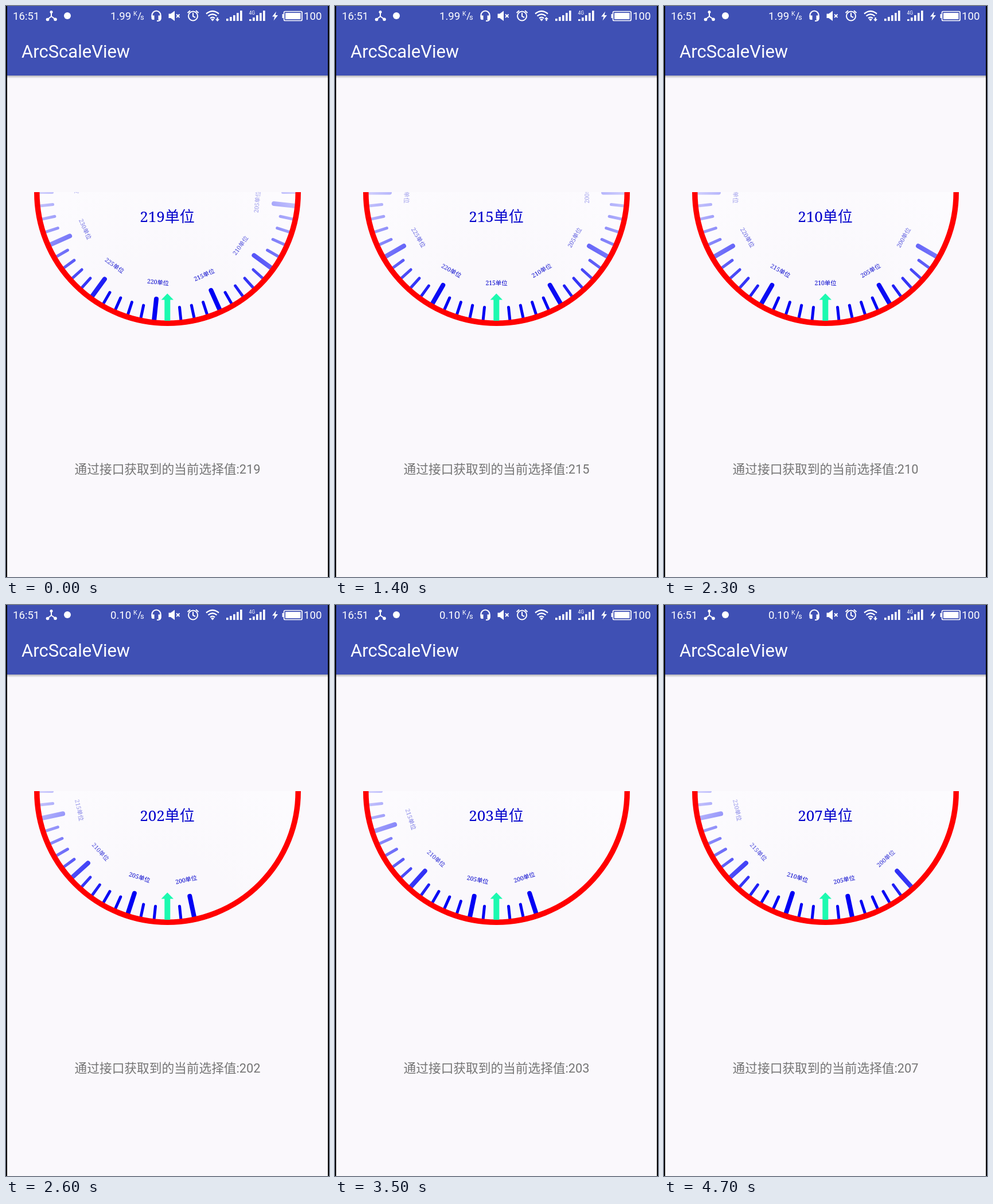
Animation of 563 by 994 pixels, one loop 5100 ms. Source, as an HTML page with a canvas:

```html
<!DOCTYPE html>
<html lang="zh-CN">
<head>
<meta charset="utf-8">
<title>ArcScaleView</title>
<style>
html, body { margin: 0; width: 100%; height: 100%; overflow: hidden; background: #faf8fc; }
canvas { display: block; }
</style>
</head>
<body>
<canvas id="stage" width="563" height="994"></canvas>
<script>
const ctx = document.getElementById('stage').getContext('2d');
const LOOP = 5100, CX = 281.5, CY = 324.5, MIN = 200, STEP = Math.PI / 30;
const SANS = "Roboto, 'Noto Sans CJK SC', 'Noto Sans CJK', sans-serif";
const SERIF = "'Noto Serif', 'Noto Sans CJK SC', 'Noto Sans CJK', serif";

// [start time, state] pairs
const VALUES = [[0, 219], [900, 218], [1000, 216], [1100, 215],
  [1600, 214], [1700, 212], [1800, 211], [1900, 210],
  [2400, 208], [2500, 205], [2600, 202], [2700, 200],
  [3100, 201], [3300, 202], [3500, 203], [3700, 204], [3900, 206], [4600, 207]];
const TRAFFIC = [[0, 'down'], [700, 'up'], [2300, 'down'], [2500, ''], [4700, 'down']];
const SPEED = [[0, '1.99'], [2500, '0.10']];
const at = (track, t) => track.filter(([start]) => start <= t).pop()[1];

function text(str, x, y, size, color, family = SANS, align = 'left') {
  ctx.font = `${size}px ${family}`;
  ctx.textAlign = align;
  ctx.fillStyle = color;
  ctx.fillText(str, x, y);
}

function rect(x, y, w, h, color) {
  ctx.fillStyle = color;
  ctx.fillRect(x, y, w, h);
}

const fill = path => ctx.fill(new Path2D(path));
const stroke = (path, width) => {
  ctx.lineWidth = width;
  ctx.stroke(new Path2D(path));
};

function dot(x, y, r) {
  ctx.beginPath();
  ctx.arc(x, y, r, 0, 7);
  ctx.fill();
}

function bars(x, heights) {
  heights.forEach((h, i) => rect(x + i * 6, 26 - h, 3.6, h, '#fff'));
}

function statusBar(t) {
  text('16:51', 12, 24, 18.6, '#fff');
  text(at(SPEED, t), 182, 24, 18.6, '#fff');
  text('K', 222, 17, 10.5, '#fff');
  text('s', 234, 24, 13, '#fff');
  text('100', 519, 24, 18.6, '#fff');
  text('4G', 423.5, 15, 8.5, '#fff');
  ctx.strokeStyle = ctx.fillStyle = '#fff';
  ctx.lineCap = 'butt';

  // linked nodes, plug marker
  stroke('M79 10V18L72 23.5M79 18L86 23', 2);
  dot(79, 10.5, 2.5);
  dot(72.5, 23.5, 2.8);
  dot(86, 23.2, 2.8);
  dot(107, 17, 6);

  stroke('M230 24L235 11', 1.3);

  // headset
  stroke('M254.5 19V16A7.5 7.5 0 0 1 269.5 16V22Q269.5 26 263 26', 2.2);
  fill('M253.5 16.5H258.5V24H256Q253.5 24 253.5 21ZM270.5 16.5H265.5V24H268Q270.5 24 270.5 21Z');

  // muted speaker
  fill('M283.5 13.5H287L294 8.5V26L287 21H283.5Z');
  stroke('M297 14.5L302.5 20M302.5 14.5L297 20', 1.8);

  // alarm clock
  stroke('M334 17.5A8 8 0 1 0 318 17.5A8 8 0 1 0 334 17.5M326 12V18L330 20M316.5 12L321 8M335.5 12L331 8', 2);

  // wifi
  stroke('M349 13.5Q360 4.5 371 13.5M352.5 17.5Q360 11 367.5 17.5M356 21.3Q360 18 364 21.3', 2.3);
  fill('M357 23Q360 21 363 23L360 26.5Z');
  const traffic = at(TRAFFIC, t);
  if (traffic === 'up') fill('M368.5 19L372 23H369.7V26H367.3V23H365Z');
  if (traffic === 'down') fill('M368.5 27L372 23H369.7V20H367.3V23H365Z');

  bars(384, [4, 7, 10, 14, 18]);
  bars(424, [3, 6, 10, 14, 18]);

  fill('M471 9.5L464 18.5H468.3L466.5 25.5L474 16H469.5Z');
  stroke('M486.5 9.5H514Q516 9.5 516 11.5V23.5Q516 25.5 514 25.5H486.5Q484.5 25.5 484.5 23.5V11.5Q484.5 9.5 486.5 9.5Z', 1.7);
  rect(487, 12, 26.5, 11, '#fff');
  rect(481.5, 14, 2.5, 7, '#fff');
}

function header(t) {
  rect(0, 0, 563, 121, '#3f50b4');
  const shadow = ctx.createLinearGradient(0, 121, 0, 126);
  shadow.addColorStop(0, 'rgba(0,0,0,.28)');
  shadow.addColorStop(1, 'rgba(0,0,0,0)');
  rect(0, 121, 563, 5, shadow);
  text('ArcScaleView', 27, 90, 31, '#fff');
  statusBar(t);
}

function mark(n, angle) {
  const major = n % 5 === 0;
  ctx.save();
  ctx.rotate(angle);
  ctx.strokeStyle = '#0000f4';
  ctx.lineCap = 'round';
  ctx.lineWidth = major ? 8 : 5;
  ctx.beginPath();
  ctx.moveTo(0, 224);
  ctx.lineTo(0, major ? 186.5 : 201);
  ctx.stroke();
  if (major) text(n + '单位', 0, 161, 10.4, '#0000cc', SERIF, 'center');
  ctx.restore();
}

function dial(value) {
  ctx.save();
  ctx.beginPath();
  ctx.rect(0, 324, 563, 240);
  ctx.clip();
  ctx.translate(CX, CY);
  for (let n = Math.max(MIN, value - 17); n <= value + 17; n++) mark(n, (n - value) * STEP);

  // marks fade with distance from the pointer
  const fade = ctx.createRadialGradient(0, 232, 105, 0, 232, 330);
  fade.addColorStop(0, 'rgba(253,252,255,0)');
  fade.addColorStop(1, 'rgba(253,252,255,.86)');
  ctx.fillStyle = fade;
  ctx.beginPath();
  ctx.arc(0, 0, 228, 0, Math.PI * 2);
  ctx.fill();

  ctx.strokeStyle = '#f00';
  ctx.lineWidth = 9.5;
  ctx.beginPath();
  ctx.arc(0, 0, 227.7, 0, Math.PI * 2);
  ctx.stroke();
  ctx.restore();

  text(value + '单位', 281, 376, 26, '#0000cc', SERIF, 'center');
  ctx.fillStyle = '#1cfab0';
  fill('M281.3 500.5L292 511.5H286.3V548H276.3V511.5H270.6Z');
}

function draw(now) {
  const t = now % LOOP, value = at(VALUES, t);
  rect(0, 0, 563, 994, '#faf8fc');
  header(t);
  dial(value);
  text('通过接口获取到的当前选择值:' + value, 281.5, 814, 21.7, '#747474', SANS, 'center');
  rect(0, 0, 2, 994, '#000');
  rect(561, 0, 2, 994, '#000');
  requestAnimationFrame(draw);
}
requestAnimationFrame(draw);
</script>
</body>
</html>
```
